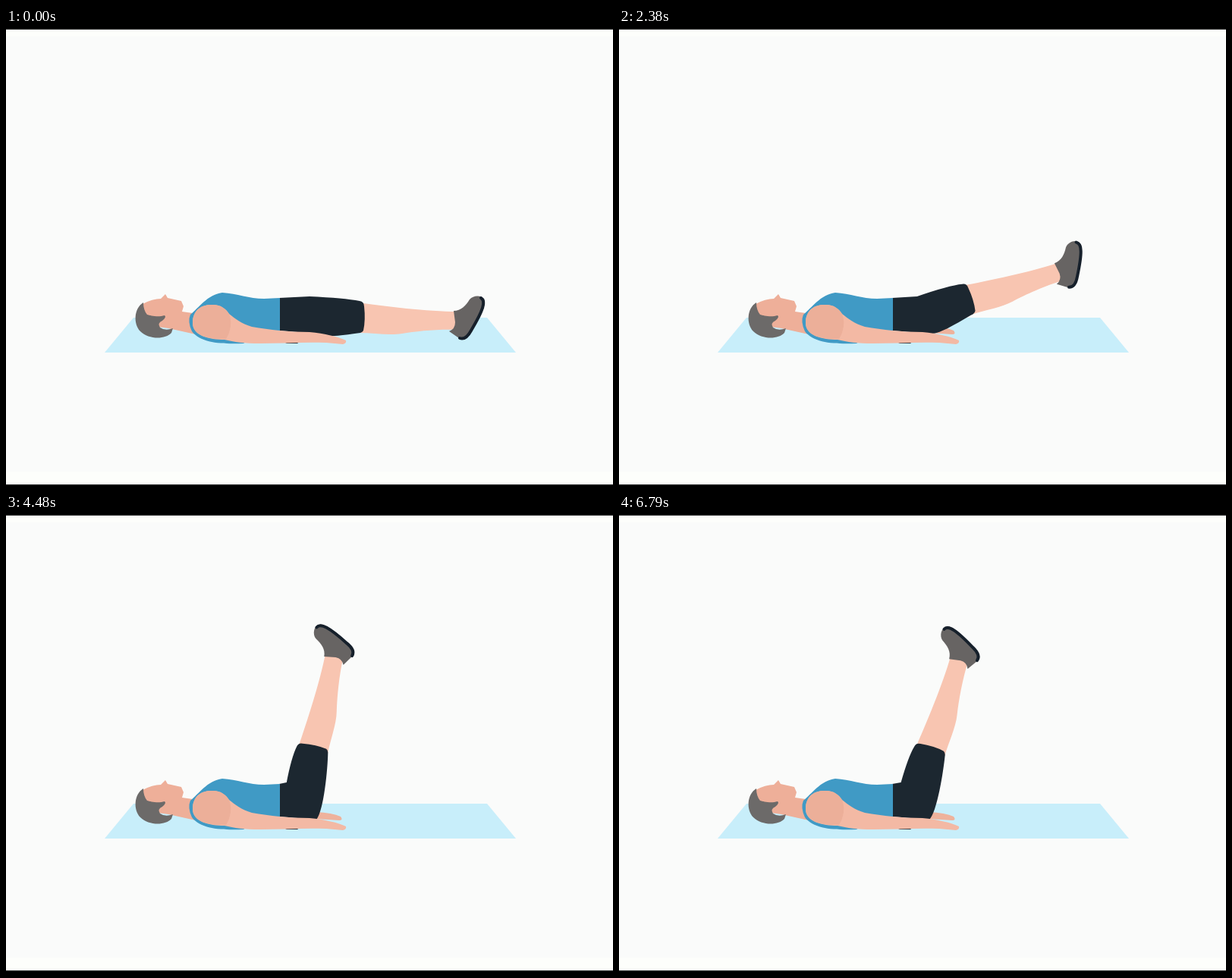
These frames come from a looping animation (800 by 604 pixels, 6860 ms). An HTML page with a canvas:

```html
<!DOCTYPE html>
<html>
<head>
<meta charset="utf-8">
<style>
  html, body { margin: 0; width: 100%; height: 100%; overflow: hidden; background: #fafbfa; }
  canvas { display: block; }
</style>
</head>
<body>
<canvas id="stage" width="800" height="604"></canvas>
<script>
const ctx = document.getElementById('stage').getContext('2d');
const LOOP = 6860, STEP = 70, CYCLE = 3150, TOP = 89;
const HIP = { x: 390, y: 381 };
const SHORTS = '#1c2730', SHIRT = '#409ac5', SKIN = '#eeaf99', LEG = '#f8c5b1';

const fill = (d, color) => {
  ctx.fillStyle = color;
  ctx.fill(new Path2D(d));
};
const stroke = (d, color, width) => {
  ctx.strokeStyle = color;
  ctx.lineWidth = width;
  ctx.stroke(new Path2D(d));
};
const ease = u => (1 - Math.cos(Math.PI * Math.min(1, Math.max(0, u)))) / 2;

// Leg lift in degrees: quick rise, slow descent, short rest
function lift(time) {
  const t = time % CYCLE;
  return TOP * (t < 854 ? ease((t - 50) / 600) : 1 - ease((t - 854) / 2190));
}

function drawRoom() {
  ctx.fillStyle = '#fafbfa';
  ctx.fillRect(0, 0, 800, 604);
  ctx.fillStyle = '#fdfefb';
  ctx.fillRect(0, 2, 800, 9);
  ctx.fillRect(0, 585, 800, 17);
  ctx.fillStyle = '#000';
  ctx.fillRect(0, 0, 800, 2);
  ctx.fillRect(0, 602, 800, 2);
  fill('M168 382H634L672 428H130Z', '#c8eefa');
}

function drawLeg(deg) {
  const a = deg * Math.PI / 180, cos = Math.cos(a), sin = Math.sin(a);
  const shift = -5 * Math.min(1, deg / 30), low = 1 - deg / TOP;
  // Point given along and across the thigh, turned about the hip
  const at = (x, y) => `${HIP.x + x * cos + y * sin} ${HIP.y - x * sin + y * cos} `;

  ctx.save();
  ctx.translate(HIP.x, HIP.y);
  ctx.rotate(-a);
  ctx.translate(shift - HIP.x, -HIP.y);
  fill('M464 362C500 367 555 374 595 374L593 398C570 397 540 400 522 403C505 406 485 402 464 402Z', LEG);
  fill('M590 373C600 373 606 366 611 358C616 352 627 352 630 358Q633 363 628 372' +
    'L613 401C609 409 602 413 597 409L584 400Q592 397 592 388Z', '#676463');
  stroke('M626 356C633 360 629 372 613 399Q606 412 598 409', '#16202b', 4);
  ctx.restore();

  const hem = 81 + shift;
  fill(`M360 356L${400 - 34 * deg / TOP} 354Q${at(56, -25)}${at(hem - 5, -21)}` +
    `Q${at(hem + 1, -20)}${at(hem + 1, -14)}Q${at(hem + 3, 4)}${at(hem, 18)}` +
    `Q${at(hem - 1, 20)}${at(hem - 4, 21)}` +
    `C${at(50, 25)}${418 + 7 * low} ${390 + 18 * low} 409 403L360 399Z`, SHORTS);
}

function drawBody() {
  // Head and neck
  fill('M180 364Q193 357 204 357L210 351L213 356L231 360L234 367L232 374L246 376' +
    'L250 404Q232 400 214 396L185 392Z', SKIN);
  fill('M181 362C168 370 168 391 177 400C188 411 210 411 218 402L220 396Q210 400 203 395' +
    'Q199 389 206 386Q212 381 209 379C200 382 190 379 186 378Q181 372 181 362Z', '#6c6a69');

  // Shirt
  fill('M243 378C254 369 265 352 285 349C305 350 320 357 340 357L361 356V399L330 405L313 416' +
    'C286 417 257 416 245 400Q239 387 243 378Z', SHIRT);
  fill('M362 412H389L384 416H370Z', SHORTS);

  // Near arm
  fill('M246 389C246 371 259 365 270 365C282 364 290 370 294 377C302 383 310 390 324 394' +
    'C348 398 372 401 400 401C420 403 438 407 448 412Q449 416 444 417L422 415' +
    'C390 414 363 416 335 416C315 416 300 414 288 411C268 411 246 406 246 389Z', '#f3b9a4');
  fill('M246 389C246 371 259 365 270 365C282 364 290 370 294 377Q300 393 290 410' +
    'C268 411 246 406 246 389Z', '#ecaf99');
}

function draw(now) {
  const t = Math.floor(now % LOOP / STEP) * STEP;
  ctx.lineCap = ctx.lineJoin = 'round';
  drawRoom();
  fill('M408 393Q430 394 441 399Q445 404 439 404L408 402Z', '#eeb29c');
  drawLeg(lift(t));
  drawBody();
}

let start;
function tick(now) {
  start ??= now;
  draw(now - start);
  requestAnimationFrame(tick);
}
requestAnimationFrame(tick);
</script>
</body>
</html>
```
